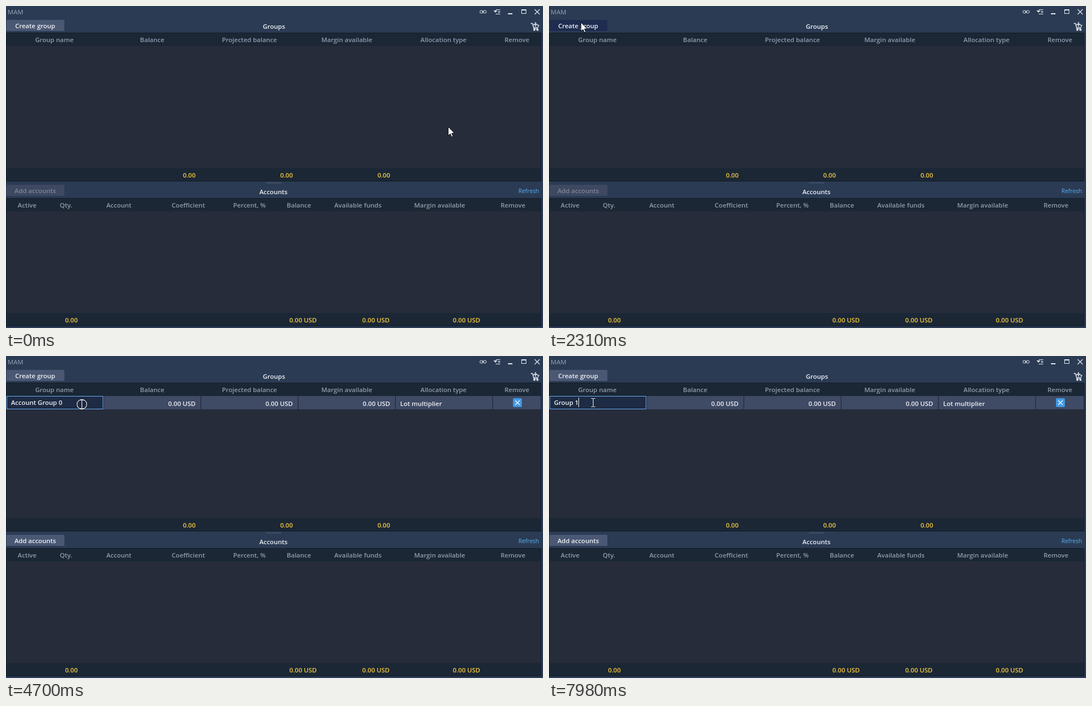
Write an HTML page with a canvas that moves like this. It is 966x580 px and loops after 8 s.

```html
<!DOCTYPE html>
<html lang="en">
<head>
<meta charset="utf-8">
<title>Account groups</title>
<style>
html, body { margin: 0; width: 100%; height: 100%; overflow: hidden; background: #2b3b54; }
canvas { display: block; }
</style>
</head>
<body>
<canvas id="stage" width="966" height="580"></canvas>
<script>
const ctx = document.getElementById('stage').getContext('2d');
const LOOP = 8000;
const UI = '600 11.5px "Open Sans", "Noto Sans", sans-serif';
const TITLE = '11.5px "Open Sans", "Noto Sans", sans-serif';
const SMALL = '10.5px "Open Sans", "Noto Sans", sans-serif';
const TIP = '11px "Liberation Sans", Arial, sans-serif';
const GREY = '#909dad', WHITE = '#eef1f5', YELLOW = '#f7cb3c';
const EDIT_X = 9;

// time, x, y, easing into the next point
const PATH = [
  [0, 795, 217], [240, 795, 217], [330, 790, 217], [580, 790, 217, 'in'],
  [980, 560, 190], [1360, 233, 118], [1690, 85, 41], [1900, 62, 9],
  [2070, 62, 9, 'both'], [2370, 56, 31], [2520, 56, 31], [2730, 58, 34],
  [2960, 58, 34], [3000, 60, 34], [3240, 60, 34], [3250, 62, 34],
  [3430, 62, 34], [3570, 66, 34], [3860, 66, 34, 'both'], [4580, 136, 87],
  [4850, 136, 87, 'both'], [5400, 119, 89, 'both'], [5950, 58, 91],
  [6130, 58, 91, 'both'], [6550, 8, 86], [6750, 8, 86],
  [6760, 121, 93, 'both'], [7220, 79, 84], [LOOP, 79, 84]
];
const EASE = {
  in: k => k * k,
  both: k => k * k * (3 - 2 * k)
};

function pointer(t) {
  const i = PATH.findIndex(p => p[0] > t);
  const [t0, x0, y0, ease] = PATH[i - 1], [t1, x1, y1] = PATH[i];
  let k = (t - t0) / (t1 - t0);
  if (EASE[ease]) k = EASE[ease](k);
  return { x: Math.round(x0 + (x1 - x0) * k), y: Math.round(y0 + (y1 - y0) * k) };
}

const within = (t, a, b) => t >= a && t < b;

function rect(x, y, w, h, color) {
  ctx.fillStyle = color;
  ctx.fillRect(x, y, w, h);
}

function text(s, x, y, color = GREY, align = 'center', font = UI) {
  ctx.font = font;
  ctx.fillStyle = color;
  ctx.textAlign = align;
  ctx.fillText(s, x, y);
}

function line(points, color = '#e4eaf1', width = 1) {
  ctx.beginPath();
  points.forEach(([x, y], i) => i ? ctx.lineTo(x, y) : ctx.moveTo(x, y));
  ctx.strokeStyle = color;
  ctx.lineWidth = width;
  ctx.stroke();
}

function textWidth(s) {
  ctx.font = UI;
  return ctx.measureText(s).width;
}

function button(label, y, state) {
  const fill = { normal: '#4a5874', hover: '#1f2c50', disabled: '#3e4961' }[state];
  ctx.fillStyle = fill;
  ctx.beginPath();
  ctx.roundRect(1, y, 104, 20, 1.5);
  ctx.fill();
  text(label, 52.5, y + 15, state === 'disabled' ? '#7c8596' : WHITE);
}

function table(top, bottom, headers, totals) {
  rect(0, top, 963, bottom - top, '#121b27');
  rect(1, top + 1, 961, 23, '#1b2735');
  rect(1, top + 24, 961, bottom - top - 48, '#272c3b');
  rect(1, bottom - 24, 961, 23, '#1b2735');
  headers.forEach(([s, x]) => text(s, x, top + 17));
  totals.forEach(([s, x]) => text(s, x, bottom - 7, YELLOW, 'right'));
}

function windowIcons() {
  ctx.strokeStyle = '#e4eaf1';
  ctx.lineWidth = 1;
  ctx.beginPath();
  ctx.roundRect(852.5, 8, 5.5, 5, 2.5);
  ctx.roundRect(858.5, 8, 5.5, 5, 2.5);
  ctx.stroke();
  line([[856, 10.5], [860, 10.5]]);

  ctx.fillStyle = '#e4eaf1';
  ctx.beginPath();
  ctx.moveTo(877, 8); ctx.lineTo(884, 8); ctx.lineTo(880.5, 12);
  ctx.fill();
  [[881, 6.5], [885, 9.5], [885, 11.5], [881, 14.5]].forEach(([x, y]) => line([[x, y], [889, y]]));

  rect(903, 13, 8, 2, '#e4eaf1');
  ctx.lineWidth = 1;
  ctx.strokeRect(927.5, 6.5, 8, 7);
  rect(927, 6, 9, 2, '#e4eaf1');
  line([[951, 6], [960, 15]], undefined, 1.2);
  line([[960, 6], [951, 15]], undefined, 1.2);
}

function cart() {
  line([[944, 31.5], [947, 31.5], [949.5, 40.5], [957, 40.5]], undefined, 1.3);
  line([[948, 34.5], [950, 34.5]]);
  line([[955, 34.5], [958.5, 34.5], [957, 38.5], [949, 38.5]], undefined, 1.2);
  line([[952.5, 29], [952.5, 37]], undefined, 1.6);
  line([[949, 33], [956, 33]], undefined, 1.6);
  [950.5, 956].forEach(x => {
    ctx.beginPath();
    ctx.arc(x, 42.8, 1.2, 0, Math.PI * 2);
    ctx.stroke();
  });
}

function groupName(t) {
  if (t < 6730) return 'Account Group 0';
  if (t < 7830) return 'Group 0';
  return t < 7950 ? 'Group ' : 'Group 1';
}

function selection(t, name, mouse) {
  if (t < 4610) return [0, name.length];
  if (!within(t, 6130, 6730)) return null;
  const end = 'Account '.length;
  let start = 0;
  while (start < end && EDIT_X + textWidth(name.slice(0, start + 1)) <= mouse.x + 3) start++;
  return [start, end];
}

function caretIndex(t, name, range) {
  if (range) return t < 4610 ? range[1] : range[0];
  return within(t, 6730, 7200) ? 0 : name.length;
}

function caretShown(t) {
  return !(within(t, 4320, 4900) || within(t, 5430, 5950) || within(t, 7260, 7800));
}

function editor(t, mouse) {
  const name = groupName(t);
  const range = selection(t, name, mouse);
  const at = i => Math.round(EDIT_X + textWidth(name.slice(0, i)));
  rect(1, 72, 174, 24, '#69aef0');
  rect(2, 73, 172, 22, '#1e2b44');
  if (range) rect(at(range[0]), 75, at(range[1]) - at(range[0]), 17, '#0c78d6');
  text(name, EDIT_X, 88, WHITE, 'left');
  if (caretShown(t)) rect(at(caretIndex(t, name, range)), 75, 1, 17, '#fff');
}

function groupRow(t, mouse) {
  const selected = t >= 3790;
  rect(1, 72, 961, 24, selected ? '#3f4a65' : '#232a39');
  [175, 350, 525, 700, 875].forEach(x => rect(x, 72, 1, 24, '#192331'));
  [341, 516, 691].forEach(x => text('0.00 USD', x, 90, WHITE, 'right'));
  text('Lot multiplier', 709, 90, WHITE, 'left');
  ctx.fillStyle = '#409be5';
  ctx.beginPath();
  ctx.roundRect(912, 76, 16, 16, 2);
  ctx.fill();
  line([[916, 80], [924, 88]], '#fff', 1.3);
  line([[924, 80], [916, 88]], '#fff', 1.3);
  if (selected) editor(t, mouse);
  else text('Account Group 0', EDIT_X, 90, WHITE, 'left');
}

function tooltip(alpha) {
  ctx.save();
  ctx.globalAlpha = alpha;
  rect(0, 2, 145, 19, 'rgba(10,18,32,.4)');
  ctx.beginPath();
  ctx.moveTo(-39, -1);
  ctx.lineTo(143, -1); ctx.lineTo(143, 19);
  ctx.lineTo(58, 19); ctx.lineTo(52.5, 24.5); ctx.lineTo(47, 19);
  ctx.lineTo(-39, 19);
  ctx.fillStyle = '#8fa6c6';
  ctx.fill();
  text('Create new multi account group', 129, 12, '#0b111c', 'right', TIP);
  ctx.restore();
}

function arrow({ x, y }) {
  const shape = [[0, 0], [0, 16], [3.7, 12.7], [6.3, 18.3], [8.7, 17.2], [6.2, 11.8], [11, 11.5]];
  ctx.beginPath();
  shape.forEach(([dx, dy]) => ctx.lineTo(x + .5 + dx, y + .5 + dy));
  ctx.closePath();
  ctx.fillStyle = '#fff';
  ctx.fill();
  ctx.strokeStyle = '#0a0d14';
  ctx.lineWidth = 1;
  ctx.stroke();
}

function beam({ x, y }) {
  rect(x, y - 7, 1, 14, '#fff');
  [-8, 7].forEach(dy => {
    rect(x - 3, y + dy, 3, 1, '#fff');
    rect(x + 1, y + dy, 3, 1, '#fff');
  });
}

function clickRing({ x, y }) {
  ctx.beginPath();
  ctx.arc(x + .5, y, 8.7, 0, Math.PI * 2);
  ctx.strokeStyle = 'rgba(8,12,20,.6)';
  ctx.lineWidth = 2.6;
  ctx.stroke();
  ctx.strokeStyle = '#f2f4f7';
  ctx.lineWidth = 1.2;
  ctx.stroke();
}

function draw(t) {
  const mouse = pointer(t);
  const hasGroup = t >= 3540;
  const hover = mouse.x < 105 && mouse.y >= 25 && mouse.y < 46;

  rect(0, 0, 966, 580, '#2b3b54');
  text('MAM', 3, 15, '#98a4b5', 'left', TITLE);
  windowIcons();
  button('Create group', 25, hover ? 'hover' : 'normal');
  text('Groups', 482, 41, WHITE);
  cart();
  table(48, 316, [
    ['Group name', 87], ['Balance', 263], ['Projected balance', 438],
    ['Margin available', 613], ['Allocation type', 787], ['Remove', 919]
  ], [['0.00', 341], ['0.00', 516], ['0.00', 691]]);

  for (let x = 468; x < 496; x += 2) {
    rect(x, 317, 1, 1, '#5a6880');
    rect(x, 319, 1, 1, '#5a6880');
  }
  button('Add accounts', 322, t >= 3790 ? 'normal' : 'disabled');
  text('Accounts', 481, 339, WHITE);
  text('Refresh', 959, 337, '#58b2f3', 'right', SMALL);
  table(346, 577, [
    ['Active', 38], ['Qty.', 108], ['Account', 203], ['Coefficient', 328],
    ['Percent, %', 438], ['Balance', 527], ['Available funds', 633],
    ['Margin available', 780], ['Remove', 912]
  ], [['0.00', 129], ['0.00 USD', 559], ['0.00 USD', 690], ['0.00 USD', 853]]);

  if (hasGroup) groupRow(t, mouse);
  if (within(t, 2520, 3460)) tooltip(Math.min(1, (t - 2490) / 240));

  if (within(t, 6550, 6760)) return;
  const pressed = [[3430, 3570], [4610, 4770], [6130, 6250], [7140, 7250]];
  if (pressed.some(([a, b]) => within(t, a, b))) clickRing(mouse);
  const editing = t >= 3790 && mouse.x < 175 && within(mouse.y, 73, 93);
  (editing ? beam : arrow)(mouse);
}

function tick(now) {
  draw(now % LOOP);
  requestAnimationFrame(tick);
}
requestAnimationFrame(tick);
</script>
</body>
</html>
```
